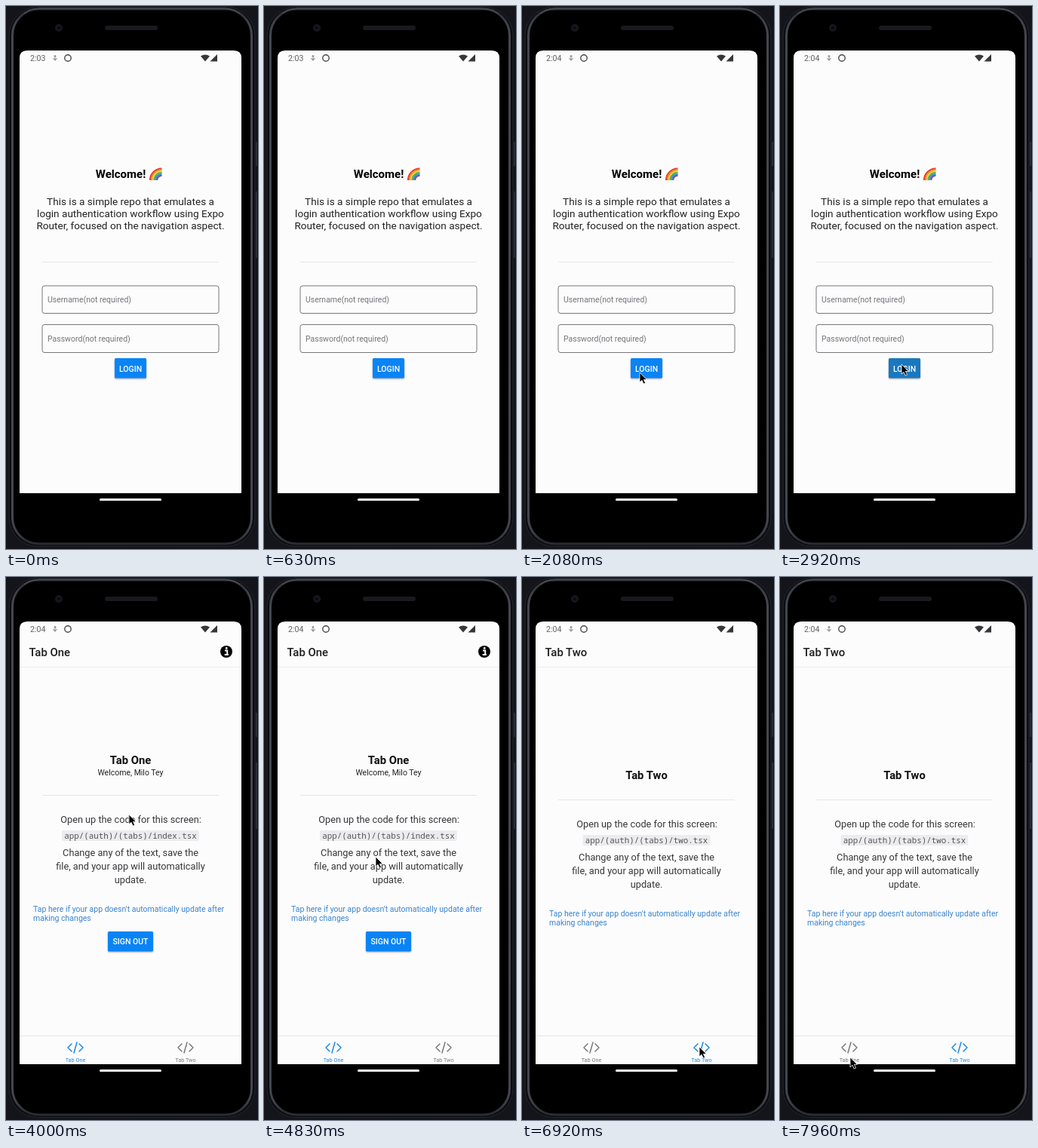
An HTML page that plays this animation: 334 by 720 pixels, repeating every 8000 ms.

```html
<!DOCTYPE html>
<html lang="en">
<head>
<meta charset="utf-8">
<title>Login flow</title>
<style>
  html, body { margin: 0; width: 100%; height: 100%; overflow: hidden; background: #14151b; }
  svg { display: block; width: 334px; height: 720px; font-family: Roboto, sans-serif; }
  .mid { text-anchor: middle; }
  .bold { font-weight: 700; }
  .med { font-weight: 500; }
  .mono { font-family: "Noto Sans Mono", monospace; font-size: 10.85px; fill: #55555a; }
  .copy { font-size: 12.74px; fill: #37373a; }
  .small { font-size: 10.5px; }
  .rule { stroke: #e6e6e9; stroke-width: 1; }
  .raised { filter: drop-shadow(0 1.5px 1.2px rgba(0, 0, 0, .35)); }
</style>
</head>
<body>
<svg id="stage" viewBox="0 0 334 720">
  <defs>
    <linearGradient id="rim" x2="1" y2="0">
      <stop offset="0" stop-color="#45464f"/>
      <stop offset=".06" stop-color="#2b2c33"/>
      <stop offset=".94" stop-color="#2b2c33"/>
      <stop offset="1" stop-color="#45464f"/>
    </linearGradient>
    <path id="tag" d="M-5-5L-10 0L-5 5M5-5L10 0L5 5M2-7L-2 7" fill="none" stroke-width="1.5" stroke-linecap="round" stroke-linejoin="round"/>
  </defs>

  <rect width="334" height="720" fill="#14151b"/>
  <path d="M331 180h2v32h-2zM331 246h2v88h-2z" fill="#2b2c34"/>
  <rect x="4" y="1.5" width="326" height="715" rx="38" fill="#0c0d11" stroke="#25262d"/>
  <rect x="8.5" y="4" width="317" height="709" rx="35" fill="#000" stroke="url(#rim)" stroke-width="3"/>
  <path d="M24 10Q32 3.5 44 3.5H290Q302 3.5 310 10" fill="none" stroke="#50515a" stroke-width="1.3"/>
  <circle cx="70" cy="29" r="5" fill="#16171d"/>
  <circle cx="70" cy="29" r="2" fill="#090a0e"/>
  <rect x="131" y="26" width="70" height="6" rx="3" fill="#191a20"/>
  <path d="M18 646V69Q18 59 28 59H302Q312 59 312 69V646Z" fill="#fcfcfd"/>
  <rect x="124" y="653" width="82" height="3" rx="1.5" fill="#f8f8fa"/>

  <g fill="#616165">
    <text id="clock" x="32" y="73" font-size="10.6"></text>
    <path d="M65 65v7M62.5 69l2.5 3.2L67.5 69M63.5 66.5h3" fill="none" stroke="#7b7b80"/>
    <circle cx="82" cy="69" r="4.2" fill="none" stroke="#48484c" stroke-width="1.4"/>
    <path d="M258 66.5Q264 62.5 270 66.5L264 73.5Z" fill="#37373a"/>
    <path d="M270.5 73.5L280 64V73.5Z" fill="#37373a"/>
  </g>

  <g id="login">
    <text class="mid bold" x="152" y="228" font-size="15">Welcome!</text>
    <g id="rainbow" fill="none" stroke-width="2"></g>
    <g class="mid" font-size="13.6" fill="#222224">
      <text x="165" y="264">This is a simple repo that emulates a</text>
      <text x="165" y="280">login authentication workflow using Expo</text>
      <text x="165" y="296">Router, focused on the navigation aspect.</text>
    </g>
    <path class="rule" d="M48 339.5H282"/>
    <g fill="none" stroke="#77777b">
      <rect x="48" y="371" width="234" height="36.5" rx="3"/>
      <rect x="48" y="422.5" width="234" height="37" rx="3"/>
    </g>
    <g class="small" fill="#75757a">
      <text x="55" y="393">Username(not required)</text>
      <text x="55" y="445">Password(not required)</text>
    </g>
    <rect id="button" class="raised" x="144" y="467" width="42" height="26.5" rx="1.5"/>
    <text class="mid med small" x="165" y="485" fill="#fff">LOGIN</text>
  </g>

  <g id="tabs">
    <text id="header" class="med" x="30.5" y="104.5" font-size="14.9" fill="#1c1c1e"></text>
    <path class="rule" d="M18 119.5H312" opacity=".6"/>
    <text id="title" class="mid bold" x="165" font-size="14.8" fill="#111"></text>
    <g id="first">
      <circle cx="292" cy="99" r="8" fill="#000"/>
      <path d="M290 97.5h3.2v5M289.7 103h5.2" fill="none" stroke="#fcfcfd" stroke-width="2"/>
      <circle cx="292.2" cy="94.4" r="1.4" fill="#fcfcfd"/>
      <text class="mid small" x="165" y="263" fill="#222224">Welcome, Milo Tey</text>
      <rect class="raised" x="135" y="470" width="60" height="26.5" rx="1.5" fill="#0a84f5"/>
      <text class="mid med small" x="165" y="487" fill="#fff">SIGN OUT</text>
    </g>
    <g id="body">
      <path class="rule" d="M48 289.5H282"/>
      <g class="mid copy">
        <text x="165.5" y="326">Open up the code for this screen:</text>
        <rect id="chip" y="336" height="14" rx="2" fill="#ececee"/>
        <text id="file" class="mono" x="165" y="347"></text>
        <text x="165" y="370">Change any of the text, save the</text>
        <text x="165" y="388">file, and your app will automatically</text>
        <text x="165" y="406">update.</text>
      </g>
      <g class="small" fill="#3a84cc">
        <text x="36" y="443.5">Tap here if your app doesn't automatically update after</text>
        <text x="36" y="456">making changes</text>
      </g>
    </g>
    <path class="rule" d="M18 608.5H312"/>
    <g class="mid" font-size="7.3">
      <g id="tab1"><use href="#tag" x="92" y="624" stroke="currentColor"/><text x="92" y="643" fill="currentColor">Tab One</text></g>
      <g id="tab2"><use href="#tag" x="238" y="624" stroke="currentColor"/><text x="238" y="643" fill="currentColor">Tab Two</text></g>
    </g>
  </g>

  <path id="cursor" d="M0 0V13L3 10.3L5.2 15L7.6 13.9L5.4 9.4H9.4Z" fill="#000" stroke="#fff" stroke-width=".8" stroke-linejoin="round"/>
</svg>
<script>
const LOOP = 8000;
const $ = id => document.getElementById(id);
const show = (id, on) => $(id).setAttribute("display", on ? "inline" : "none");
const set = (id, attrs) => {
  for (const key in attrs) $(id).setAttribute(key, attrs[key]);
};
const write = (id, text) => {
  if ($(id).textContent !== text) $(id).textContent = text;
};

// Pointer stops: time, x, y
const stops = [
  [850, 336, 560], [1400, 156, 486], [2250, 156, 486], [2750, 161, 475],
  [3300, 161, 475], [3950, 163, 315], [4250, 163, 315], [4800, 148, 371],
  [5200, 148, 371], [6170, 201, 615], [6500, 235, 623], [7000, 235, 623],
  [7850, 93, 637]
];

const bands = ["#e8392c", "#f58a1f", "#f7d32e", "#4fb04a", "#2f8fd8", "#7d4bab"];
$("rainbow").innerHTML = bands.map((color, i) => {
  const r = 15.5 - i * 1.85;
  return `<path d="M${206.5 - r} 231A${r} ${r} 0 0 1 206.5 ${231 - r}" stroke="${color}"/>`;
}).join("");

function pointer(t) {
  const next = stops.findIndex(s => s[0] > t);
  if (next < 0) return stops[stops.length - 1].slice(1);
  if (next === 0) return stops[0].slice(1);
  const [t0, x0, y0] = stops[next - 1];
  const [t1, x1, y1] = stops[next];
  const p = (t - t0) / (t1 - t0);
  const k = p * p * (3 - 2 * p);
  return [x0 + (x1 - x0) * k, y0 + (y1 - y0) * k];
}

function draw(t) {
  const loggedIn = t >= 3180;
  const second = t >= 6750;
  const name = second ? "Tab Two" : "Tab One";
  const file = `app/(auth)/(tabs)/${second ? "two" : "index"}.tsx`;
  const width = file.length * 6.51 + 6;
  const tint = active => active ? "#2087dc" : "#79797d";

  write("clock", t < 700 ? "2:03" : "2:04");
  show("login", !loggedIn);
  show("tabs", loggedIn);
  show("first", !second);
  set("button", { fill: t >= 2800 ? "#1a78c0" : "#0a84f5" });

  write("header", name);
  write("title", name);
  write("file", file);
  set("title", { y: second ? 268 : 248 });
  set("chip", { x: 165 - width / 2, width });
  set("body", { transform: `translate(0 ${second ? 6 : 0})` });
  set("tab1", { color: tint(!second) });
  set("tab2", { color: tint(second) });

  show("cursor", t >= 850);
  set("cursor", { transform: `translate(${pointer(t).join(" ")})` });
}

const start = performance.now();
function tick(now) {
  draw(Math.max(0, now - start) % LOOP);
  requestAnimationFrame(tick);
}
draw(0);
requestAnimationFrame(tick);
</script>
</body>
</html>
```
